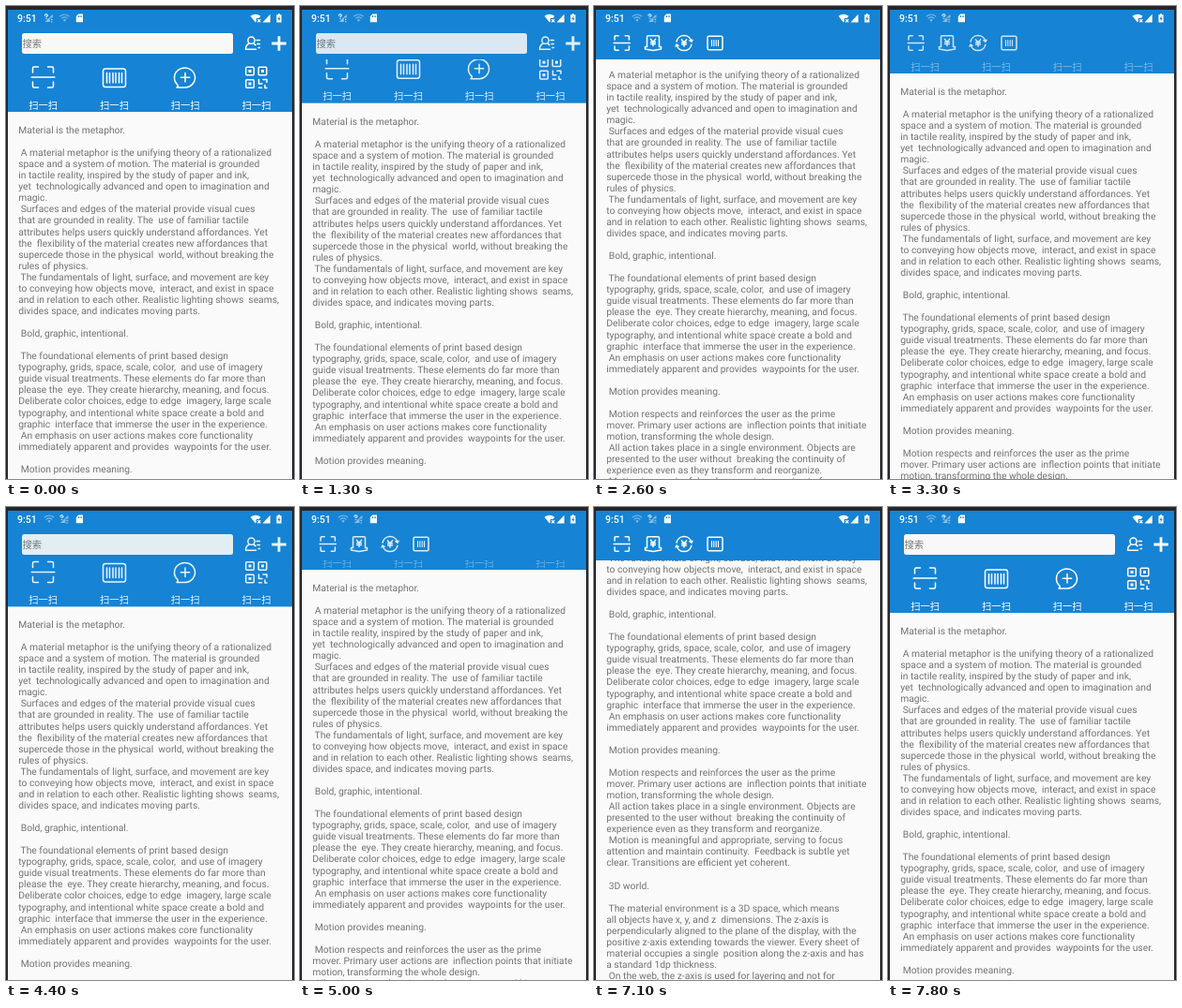
An HTML page that plays this animation: 307 by 505 pixels, repeating every 8 s.

```html
<!DOCTYPE html>
<html lang="zh-CN">
<head>
<meta charset="utf-8">
<title>Collapsing header</title>
<style>
@property --s { syntax: "<number>"; inherits: true; initial-value: 0; }

html, body { margin: 0; width: 100%; height: 100%; overflow: hidden; background: #fafafa; }

/* --s: scrolled distance, --c: the part of it taken by the header */
.stage {
  --c: min(var(--s), 56);
  position: relative; width: 307px; height: 505px; overflow: hidden;
  animation: scroll 8s step-end -10ms infinite;
}
svg { position: absolute; inset: 0; }

.page {
  position: absolute; left: 13.2px; top: 126.95px; margin: 0;
  font: 10.31px/12.065px Roboto, sans-serif; color: #737373; white-space: pre;
  text-rendering: geometricPrecision;
  transform: translateY(calc(var(--s) * -1px));
}
.header { transform: translateY(calc(var(--c) * -1px)); }
.grid { opacity: calc(1 - var(--c) / 71.6); }
.open { opacity: min(1 - var(--c) / 71.6, (28 - var(--c)) * 99); }
.closed { opacity: min(.216 + var(--c) * .014, (var(--c) - 28) * 99); }

.blue { fill: #1683d4; }
.white { fill: #fff; }
.line {
  fill: none; stroke: #fff; stroke-width: 1.5; stroke-linecap: round; stroke-linejoin: round;
  vector-effect: non-scaling-stroke;
}
.thin { stroke-width: 1.1; }
.cjk { font: 10.3px "Noto Sans CJK SC", "Noto Sans CJK", sans-serif; }
.clock { font: 500 10.5px Roboto, sans-serif; }

.wifi { animation: wifi 8s step-end -10ms infinite; }
.cell { animation: cell 8s step-end -10ms infinite; }
@keyframes wifi { 0% { transform: translateX(16.5px); } 31.25%, 100% { transform: none; } }
@keyframes cell { 0% { transform: none; } 31.25%, 100% { transform: translateX(16.5px); } }

@keyframes scroll {
  0%     { --s: 0; }
  13.75% { --s: 0; animation-timing-function: steps(9); }
  25%    { --s: 42; animation-timing-function: steps(3); }
  28.75% { --s: 57; animation-timing-function: steps(5); }
  35%    { --s: 100; }
  37.5%  { --s: 100; animation-timing-function: steps(3); }
  41.25% { --s: 41; animation-timing-function: steps(3); }
  45%    { --s: 9; }
  46.25% { --s: 3; }
  48.75% { --s: 0; }
  53.75% { --s: 0; animation-timing-function: steps(7); }
  62.5%  { --s: 46; animation-timing-function: steps(2); }
  65%    { --s: 60; animation-timing-function: steps(3); }
  68.75% { --s: 90; }
  70%    { --s: 90; animation-timing-function: steps(5); }
  76.25% { --s: 14; animation-timing-function: steps(2); }
  78.75% { --s: 0; }
  81.25% { --s: 0; animation-timing-function: steps(3); }
  85%    { --s: 62; animation-timing-function: steps(3); }
  88.75% { --s: 234.6; }
  90%    { --s: 240; animation-timing-function: steps(3); }
  93.75% { --s: 48; animation-timing-function: steps(3); }
  97.5%, 100% { --s: 0; }
}
</style>
</head>
<body>
<div class="stage">
<div class="page">Material is the metaphor.

 A material metaphor is the unifying theory of a rationalized
space and a system of motion. The material is grounded
in tactile reality, inspired by the study of paper and ink,
yet  technologically advanced and open to imagination and
magic.
 Surfaces and edges of the material provide visual cues
that are grounded in reality. The  use of familiar tactile
attributes helps users quickly understand affordances. Yet
the  flexibility of the material creates new affordances that
supercede those in the physical  world, without breaking the
rules of physics.
 The fundamentals of light, surface, and movement are key
to conveying how objects move,  interact, and exist in space
and in relation to each other. Realistic lighting shows  seams,
divides space, and indicates moving parts.

 Bold, graphic, intentional.

 The foundational elements of print based design
typography, grids, space, scale, color,  and use of imagery
guide visual treatments. These elements do far more than
please the  eye. They create hierarchy, meaning, and focus.
Deliberate color choices, edge to edge  imagery, large scale
typography, and intentional white space create a bold and
graphic  interface that immerse the user in the experience.
 An emphasis on user actions makes core functionality
immediately apparent and provides  waypoints for the user.

 Motion provides meaning.

 Motion respects and reinforces the user as the prime
mover. Primary user actions are  inflection points that initiate
motion, transforming the whole design.
 All action takes place in a single environment. Objects are
presented to the user without  breaking the continuity of
experience even as they transform and reorganize.
 Motion is meaningful and appropriate, serving to focus
attention and maintain continuity.  Feedback is subtle yet
clear. Transitions are efficient yet coherent.

 3D world.

 The material environment is a 3D space, which means
all objects have x, y, and z  dimensions. The z-axis is
perpendicularly aligned to the plane of the display, with the
positive z-axis extending towards the viewer. Every sheet of
material occupies a single  position along the z-axis and has
a standard 1dp thickness.
 On the web, the z-axis is used for layering and not for
perspective. The 3D world is emulated by manipulating the
y-axis.</div>

<svg width="307" height="505" viewBox="0 0 307 505">
  <defs>
    <path id="scan" class="line" d="M-11-5V-9.5Q-11-11-9.5-11H-5M5-11H9.5Q11-11 11-9.5V-5M11 5V9.5Q11 11 9.5 11H5M-5 11H-9.5Q-11 11-11 9.5V5M-12.3 0H12.3"/>
    <path id="yen" class="line" d="M-3.2-4.5L0-.8 3.2-4.5M0-.8V4.5M-3-.5H3M-3 2H3"/>
    <g id="finder"><rect class="line" x="-4.3" y="-4.3" width="8.6" height="8.6" rx="1"/><rect class="white" x="-1.5" y="-1.5" width="3" height="3"/></g>
    <text id="label" class="cjk white" text-anchor="middle" y="109.8">扫一扫</text>
  </defs>

  <g class="header">
    <rect class="blue" width="307" height="113"/>
    <g class="grid">
      <use href="#scan" x="39.5" y="76"/>
      <rect class="line" x="103.5" y="67" width="24" height="19.5" rx="2.5"/>
      <path class="line" d="M107.5 71.5V82M110.5 71.5V82M114 71.5V82M117 71.5V82M120.5 71.5V82M123.5 71.5V82"/>
      <path class="line" d="M183 84.2A11 10.5 0 1 1 191 87H182Q183.8 86.2 183 84.2ZM191 71.5V81M186.3 76.2H195.7"/>
      <use href="#finder" x="260" y="69.5"/>
      <use href="#finder" x="273.5" y="69.5"/>
      <use href="#finder" x="260" y="83"/>
      <path class="line" d="M269.5 78.5V83H273M274 78.5H278V81.5M269.5 87.3H272.5M276 84.5V87.5H278"/>
      <use href="#label" x="39.7"/>
      <use href="#label" x="115.5"/>
      <use href="#label" x="191.2"/>
      <use href="#label" x="267"/>
    </g>
  </g>

  <rect class="blue" width="307" height="57"/>

  <g class="open">
    <rect x="17" y="29" width="225" height="22" rx="2.5" fill="#f8f8f8"/>
    <text class="cjk" x="17.5" y="43.8" fill="#777">搜索</text>
    <circle class="line" cx="261.5" cy="36.7" r="3.6"/>
    <path class="line" d="M259 40Q255.5 41.8 255.5 46.3H266.5M264 40Q265.2 40.6 266 41.7M267 36.5H270.5M268 40.5H270.5M269 44.5H270.5"/>
    <path d="M291 32.3V47.7M283.3 40H298.7" stroke="#fff" stroke-width="2.8"/>
  </g>

  <g class="closed">
    <use href="#scan" transform="translate(29.7 39.5) scale(.7)"/>
    <path class="line" d="M56.5 43.5V33Q56.5 31.7 57.8 31.7H68.2Q69.5 31.7 69.5 33V43.5M56 43.5H54.5V46L63 47.5 71.5 46V43.5H70"/>
    <path class="line" d="M88 38A8.2 8.2 0 0 1 104 38M102 36.8L104 38.2 105 36.2M104 41.2A8.2 8.2 0 0 1 88 41.2M87 43L88 41 90 42.4"/>
    <rect class="line" x="121" y="32.2" width="16" height="14.6" rx="1.5"/>
    <path class="line thin" d="M125.5 36.5V42.5M127.8 36.5V42.5M130.2 36.5V42.5M132.5 36.5V42.5"/>
    <use href="#yen" transform="translate(63 39) scale(.8)"/>
    <use href="#yen" transform="translate(96 39.5) scale(.8)"/>
  </g>

  <text class="clock white" x="12" y="16.7">9:51</text>
  <g class="wifi" opacity=".45">
    <path class="line thin" d="M41.2 11Q46 7 50.8 11M43 13.2Q46 10.6 49 13.2"/>
    <path class="white" d="M44.3 14.8Q46 13.4 47.7 14.8L46 17Z"/>
  </g>
  <g class="cell">
    <path class="white" opacity=".5" d="M41.5 17L49.8 8.8V12.5H46.8V17Z"/>
    <path class="line thin" d="M41.5 10.2Q41.7 8.7 43 8.8 44.4 9 44.2 10.3L43 11.6M43 13.3V13.4M48.8 14V14.6M48.8 16.8V16.9"/>
  </g>
  <path class="white" d="M77.2 8.5H82V17.2H74.8V11Z"/>
  <path class="blue" d="M77 10.3H78V12H77ZM78.8 10.3H79.6V12H78.8ZM80.3 10.3H81.1V12H80.3Z"/>
  <path class="white" d="M260.5 10.8Q266 6.6 271.5 10.8L269.8 12.9H266.8V16.6L266 17.4Z"/>
  <path class="line thin" d="M268.5 14.5L271 17M271 14.5L268.5 17"/>
  <path class="white" d="M273.5 17.4L281.7 8.8V17.4Z"/>
  <path class="white" d="M290 8.3H292V9.3H293.6V17.6H288.4V9.3H290Z"/>
  <path class="blue" d="M291.5 10.4L289.6 13.9H290.7V16.4L292.5 12.9H291.5Z"/>

  <path fill="#25262b" d="M0 0H307V505H305V4H2V505H0Z"/>
</svg>
</div>
</body>
</html>
```
